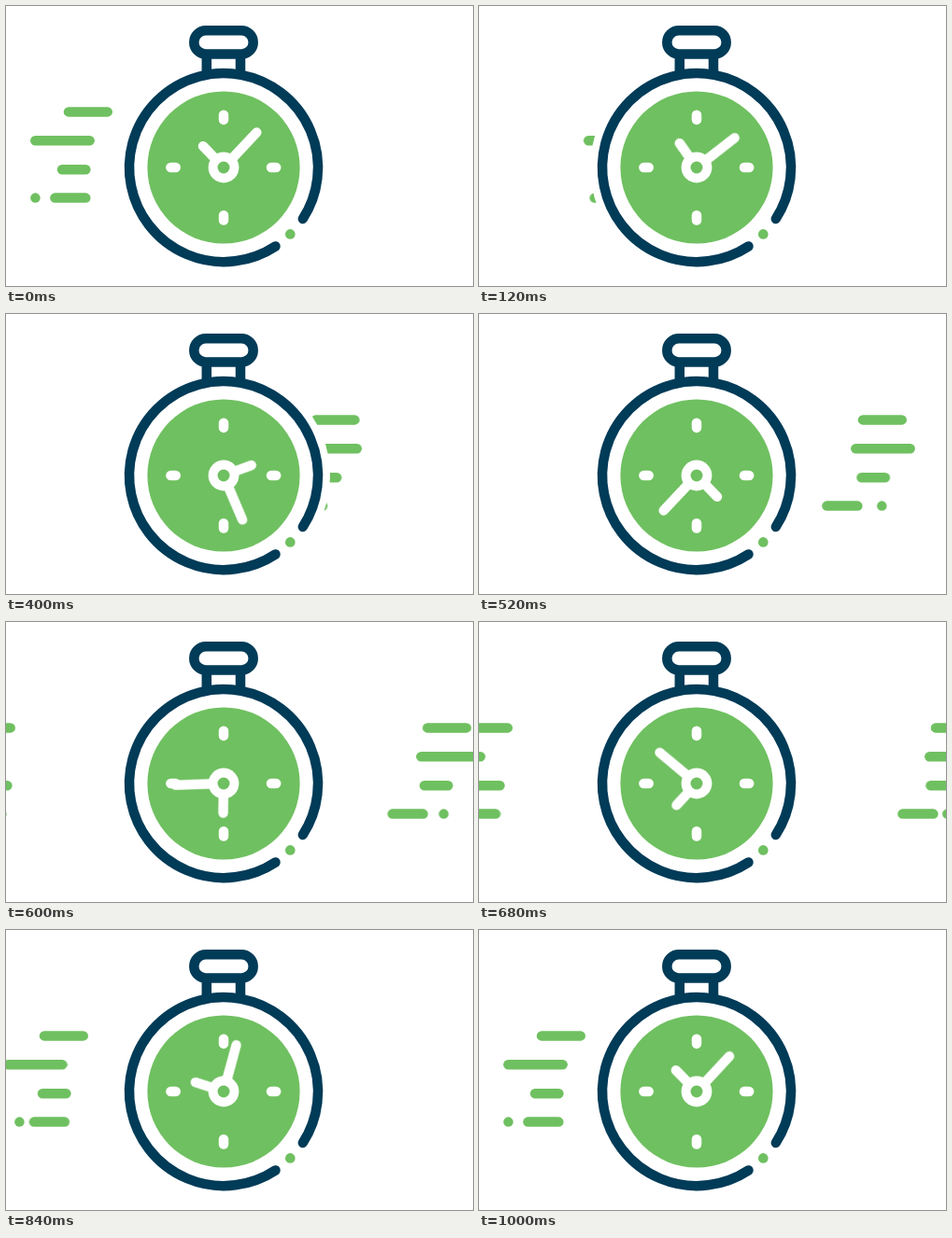
Write an HTML page that moves like this. It is 500x300 px and loops after 1.04 s.

```html
<!DOCTYPE html>
<html lang="en">
<head>
<meta charset="utf-8">
<title>Speeding stopwatch</title>
<style>
  html, body { margin: 0; width: 100%; height: 100%; overflow: hidden; background: #fff; }
  svg { display: block; width: 500px; height: 300px; }
  line, path, rect { fill: none; stroke-width: 10.5; stroke-linecap: round; }
  .navy { stroke: #003b57; }
  .white { stroke: #fff; }
  #trails line { stroke: #6fc060; }
  .green { fill: #6fc060; }
</style>
</head>
<body>
<svg viewBox="0 0 500 300">
  <g id="trails"></g>
  <circle cx="233" cy="173" r="114" fill="#fff"/>
  <g class="navy">
    <rect x="201.3" y="26.3" width="63.4" height="25.2" rx="12.6"/>
    <line x1="214.8" y1="53" x2="214.8" y2="71"/>
    <line x1="251" y1="53" x2="251" y2="71"/>
    <path d="M288.5 257.5A101 101 0 1 1 317.8 228"/>
  </g>
  <circle class="green" cx="304.3" cy="244.4" r="5.3"/>
  <circle class="green" cx="233" cy="173" r="81.6"/>
  <g class="white">
    <line x1="233" y1="116.7" x2="233" y2="121.9"/>
    <line x1="233" y1="224.2" x2="233" y2="229.6"/>
    <line x1="176.4" y1="173" x2="181.7" y2="173"/>
    <line x1="284" y1="173" x2="289.2" y2="173"/>
  </g>
  <g transform="translate(233 173)">
    <g id="hands" class="white">
      <line y1="-14" y2="-51.5" transform="rotate(43.3)"/>
      <line y1="-14" y2="-31.7" transform="rotate(-44)"/>
    </g>
    <circle r="16.4" fill="#fff"/>
    <circle class="green" r="6.5"/>
  </g>
</svg>
<script>
  const LOOP = 1040, TURN = 533, REST = 920;
  // steps(26) holds each pose for 40 ms
  const timing = { duration: LOOP, iterations: Infinity, easing: 'steps(26)', delay: -2 };

  // y, left, right, then px/ms: behind the watch, leaving, entering
  const trails = [
    [113.4, 67, 108.7, 0.6615, 0.472, 0.325],
    [144.2, 31.3, 89.6, 0.7154, 0.474, 0.367],
    [175.2, 60, 85.4, 0.672, 0.444, 0.2625],
    [205.6, 52.4, 85.3, 0.6154, 0.497, 0.281],
    [205.6, 31.4, 31.41, 0.769, 0.408, 0.2125]
  ];

  const shift = (time, x) => ({ offset: time / LOOP, transform: `translateX(${x}px)` });

  function addTrail(y, x1, x2, keys) {
    const line = document.createElementNS('http://www.w3.org/2000/svg', 'line');
    Object.entries({ x1, x2, y1: y, y2: y }).forEach(([k, v]) => line.setAttribute(k, v));
    document.getElementById('trails').append(line);
    line.animate(keys, timing);
  }

  for (const [y, x1, x2, pass, leave, enter] of trails) {
    const mid = pass * TURN, start = -enter * (REST - TURN);
    addTrail(y, x1, x2, [shift(0, 0), shift(TURN, mid), shift(LOOP, mid + leave * (LOOP - TURN))]);
    addTrail(y, x1, x2, [shift(0, start), shift(TURN, start), shift(REST, 0), shift(LOOP, 0)]);
  }

  // One eased turn, with a short rest at both ends
  const turn = time => {
    const p = Math.min(1, Math.max(0, (time - 20) / 1000));
    return 180 * (1 - Math.cos(Math.PI * p));
  };
  const spin = Array.from({ length: 27 }, (_, i) => ({ transform: `rotate(${turn(i * 40)}deg)` }));
  document.getElementById('hands').animate(spin, timing);
</script>
</body>
</html>
```
